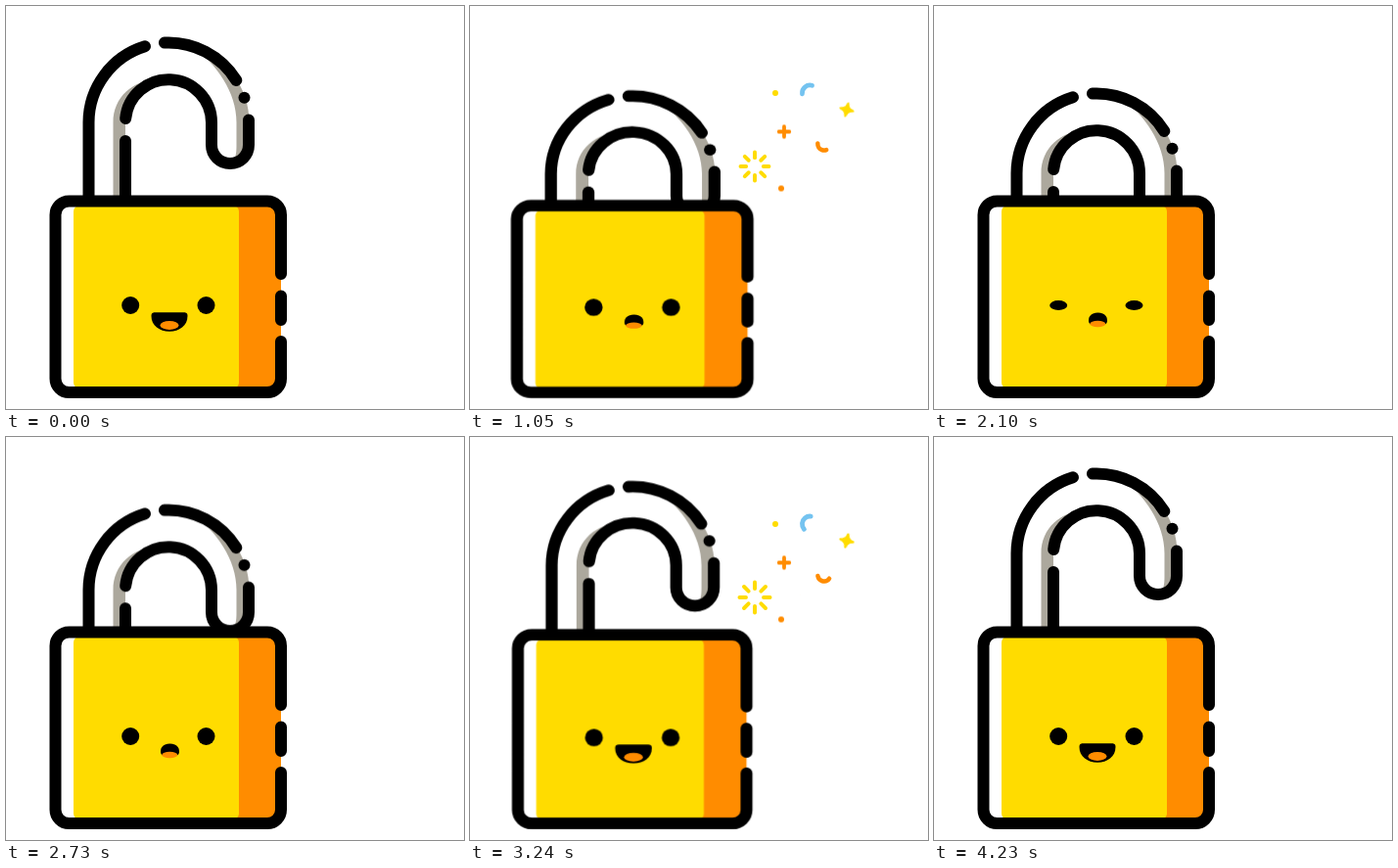
An HTML page for the animation above (4260 ms loop, 468 by 412 pixels).

```html
<!DOCTYPE html>
<html lang="en">
<head>
<meta charset="utf-8">
<title>Padlock</title>
<style>
html, body { margin: 0; width: 100%; height: 100%; overflow: hidden; background: #fff; }
svg { display: block; width: 468px; height: 412px; }
:root { --yellow: #ffdc00; --orange: #ff8c00; --blue: #74c3f0; --grey: #aca89d; }

.ink { fill: none; stroke: #000; stroke-width: 12; stroke-linecap: round; stroke-linejoin: round; }
.grey { fill: var(--grey); }
.y { fill: var(--yellow); }
.o { fill: var(--orange); }

/* One loop closes and opens the lock; the sparks run twice. */
.lock, .shackle, .mouth, .tongue, .eye { animation: 4260ms infinite; }
.lock { transform-origin: 166px 401px; animation-name: squash; animation-timing-function: ease-in-out; }
.shackle { animation-name: slide; animation-timing-function: ease-in-out; }
.mouth { animation-name: mouth; }
.tongue { animation-name: tongue; }
.eye { transform-box: fill-box; transform-origin: center; animation-name: blink; animation-timing-function: linear; }

@keyframes squash {
  0%, 19.25% { transform: scale(1, 1); }
  22.07% { transform: scale(1.06, .94); }
  27.46% { transform: scale(.98, 1.02); }
  33.57% { transform: scale(1.008, .992); }
  39.2% { transform: scale(.996, 1.004); }
  43.43%, 69.25% { transform: scale(1, 1); }
  72.07% { transform: scale(.94, 1.06); }
  77.46% { transform: scale(1.025, .975); }
  83.57% { transform: scale(.988, 1.012); }
  89.2% { transform: scale(1.003, .997); }
  93.43%, 100% { transform: scale(1, 1); }
}
@keyframes slide {
  0% { transform: translateY(0); }
  7.28% { transform: translateY(0); animation-timing-function: cubic-bezier(.33, 0, .67, .33); }
  12.68% { transform: translateY(9.5px); animation-timing-function: linear; }
  16.2% { transform: translateY(22px); animation-timing-function: cubic-bezier(.4, .2, .6, 1); }
  21.83% { transform: translateY(61px); }
  26.06% { transform: translateY(43.5px); }
  30.28% { transform: translateY(54px); }
  34.51% { transform: translateY(52px); }
  57.28% { transform: translateY(52px); animation-timing-function: cubic-bezier(.33, 0, .67, .33); }
  62.68% { transform: translateY(42.3px); animation-timing-function: linear; }
  66.2% { transform: translateY(29.8px); animation-timing-function: cubic-bezier(.4, .2, .6, 1); }
  71.83% { transform: translateY(-9px); }
  76.06% { transform: translateY(8.5px); }
  80.28% { transform: translateY(-2px); }
  84.51%, 100% { transform: translateY(0); }
}
@keyframes mouth {
  0%, 19.72%, 71.83%, 100% {
    d: path("M148.5 317C148.5 314 150 313.3 152 313.3C162 313.3 172 313.3 182 313.3C184 313.3 185.5 314 185.5 317C185.5 327 177 332.7 167 332.7C157 332.7 148.5 327 148.5 317Z");
  }
  21.83%, 69.72% {
    d: path("M158 321.5C158 317.5 160 315.5 162.5 314.5C165.5 313.3 169.5 313.3 172.5 314.5C175 315.5 177 317.5 177 321.5C177 326 174 326 167.5 326C161 326 158 326 158 321.5Z");
  }
}
@keyframes tongue {
  0%, 19.72%, 71.83%, 100% { cx: 167px; cy: 326.4px; rx: 9.5px; ry: 4.5px; }
  21.83%, 69.72% { cx: 167.3px; cy: 325px; rx: 8px; ry: 3.2px; }
}
@keyframes blink {
  0%, 46.48%, 50.47%, 100% { transform: scaleY(1); }
  48.12% { transform: scaleY(.1); }
}

.pop { animation: pop 2130ms var(--at) infinite both ease-in-out; }
@keyframes pop {
  0%, 40%, 100% { transform: scale(0); }
  10%, 30% { transform: scale(1); }
}
.star { animation: star 2130ms infinite; }
@keyframes star {
  0%, 38% { transform: rotate(40deg) scale(0); }
  52% { transform: rotate(13deg) scale(.82); }
  66% { transform: rotate(10deg) scale(1.05); }
  70% { transform: rotate(8deg) scale(1); }
  76% { transform: rotate(4deg) scale(.4); }
  79%, 100% { transform: rotate(0deg) scale(0); }
}

.line { fill: none; stroke-linecap: round; }
.rays { stroke: var(--yellow); animation: rays 2130ms infinite linear; }
@keyframes rays {
  0%, 30.5% { stroke-width: 0; stroke-dasharray: .01 99; stroke-dashoffset: 0; }
  32.4% { stroke-width: 3.6; stroke-dasharray: .01 99; stroke-dashoffset: 0; }
  52.1% { stroke-width: 4; stroke-dasharray: 6.5 99; stroke-dashoffset: -1; }
  69% { stroke-width: 4; stroke-dasharray: 1.5 99; stroke-dashoffset: -10; }
  73.2% { stroke-width: 3.5; stroke-dasharray: .01 99; stroke-dashoffset: -12.5; }
  76%, 100% { stroke-width: 0; stroke-dasharray: .01 99; stroke-dashoffset: -12.5; }
}
.blue { stroke: var(--blue); animation: blueArc 2130ms infinite linear; }
@keyframes blueArc {
  0%, 36% { stroke-width: 0; stroke-dasharray: .01 99; stroke-dashoffset: 0; }
  38% { stroke-width: 4.5; stroke-dasharray: .01 99; stroke-dashoffset: 0; }
  52.1% { stroke-width: 4.8; stroke-dasharray: 19 99; stroke-dashoffset: -6; }
  69% { stroke-width: 4.5; stroke-dasharray: 2.5 99; stroke-dashoffset: -35; }
  71%, 100% { stroke-width: 0; stroke-dasharray: .01 99; stroke-dashoffset: -37.5; }
}
.curl { stroke: var(--orange); animation: curl 2130ms infinite linear; }
@keyframes curl {
  0%, 31% { stroke-width: 0; stroke-dasharray: .01 99; stroke-dashoffset: 0; }
  32.4% { stroke-width: 4.4; stroke-dasharray: .01 99; stroke-dashoffset: 0; }
  52.1% { stroke-width: 4.5; stroke-dasharray: 15 99; stroke-dashoffset: -11; }
  69% { stroke-width: 4; stroke-dasharray: .8 99; stroke-dashoffset: -26.5; }
  71%, 100% { stroke-width: 0; stroke-dasharray: .01 99; stroke-dashoffset: -27.5; }
}
</style>
</head>
<body>
<svg viewBox="0 0 468 412">
  <defs>
    <path id="ray" d="M8 0H21"/>
    <g id="pair"><use href="#ray"/><use href="#ray" transform="rotate(45)"/></g>
  </defs>

  <g class="lock">
    <g class="shackle">
      <path class="grey" d="M109.5 260V119C109.5 93 130 74 160 75A44 44 0 0 0 122 119V260Z"/>
      <path class="grey" d="M190 41A81.5 81.5 0 0 1 248.5 119V143A19 19 0 0 1 229 162C235 157 235.5 150 235.5 143V119C235.5 88 215 59 190 41Z"/>
      <g class="ink">
        <path d="M84.5 260V119A81.5 81.5 0 0 1 142 41.3"/>
        <path d="M162 37.6A81.5 81.5 0 0 1 235.3 76"/>
        <path d="M243.5 93.7h.01"/>
        <path d="M248 116.5V142A19 19 0 0 1 210 142V119A44 44 0 0 0 122.2 115"/>
        <path d="M122 138V260"/>
      </g>
    </g>

    <rect x="50.5" y="199.5" width="230.5" height="195.5" rx="14" fill="#fff"/>
    <path class="o" d="M200 199.5H267A14 14 0 0 1 281 213.500V381A14 14 0 0 1 267 395H200Z"/>
    <rect class="y" x="69" y="204" width="169" height="187" rx="6"/>
    <path class="ink" d="M281 343V381A14 14 0 0 1 267 395H64.500A14 14 0 0 1 50.500 381V213.500A14 14 0 0 1 64.500 199.500H267A14 14 0 0 1 281 213.500V274M281 296.500V321"/>

    <circle class="eye" cx="127.200" cy="306" r="9"/>
    <circle class="eye" cx="204.500" cy="306" r="9"/>
    <path class="mouth"/>
    <ellipse class="tongue o"/>
  </g>

  <g transform="translate(291 164)">
    <g class="line rays">
      <use href="#pair"/>
      <use href="#pair" transform="rotate(90)"/>
      <use href="#pair" transform="rotate(180)"/>
      <use href="#pair" transform="rotate(270)"/>
    </g>
  </g>
  <g transform="translate(347.500 89)"><path class="line blue" d="M6.100-5.100A8 8 0 1 0 5.100 6.100"/></g>
  <g transform="translate(361.800 141)"><path class="line curl" d="M0-6.500A6.500 6.500 0 1 0 5.900 2.750"/></g>
  <g transform="translate(385 106)">
    <path class="star y" stroke="#ffdc00" stroke-width="3" stroke-linejoin="round" d="M0-8Q1-1 8 0Q1 1 0 8Q-1 1-8 0Q-1-1 0-8Z"/>
  </g>
  <g transform="translate(321 128.500)">
    <path class="pop line" style="--at:720ms" stroke="#ff8c00" stroke-width="3.800" d="M-5.300 0H5.300M0-5.300V5.300"/>
  </g>
  <g transform="translate(312 89)"><circle class="pop y" style="--at:780ms" r="3"/></g>
  <g transform="translate(318 186.500)"><circle class="pop o" style="--at:690ms" r="3"/></g>
  <g transform="translate(337.700 161.500)"><circle class="pop y" style="--at:1080ms" r="2.200"/></g>
</svg>
</body>
</html>
```
